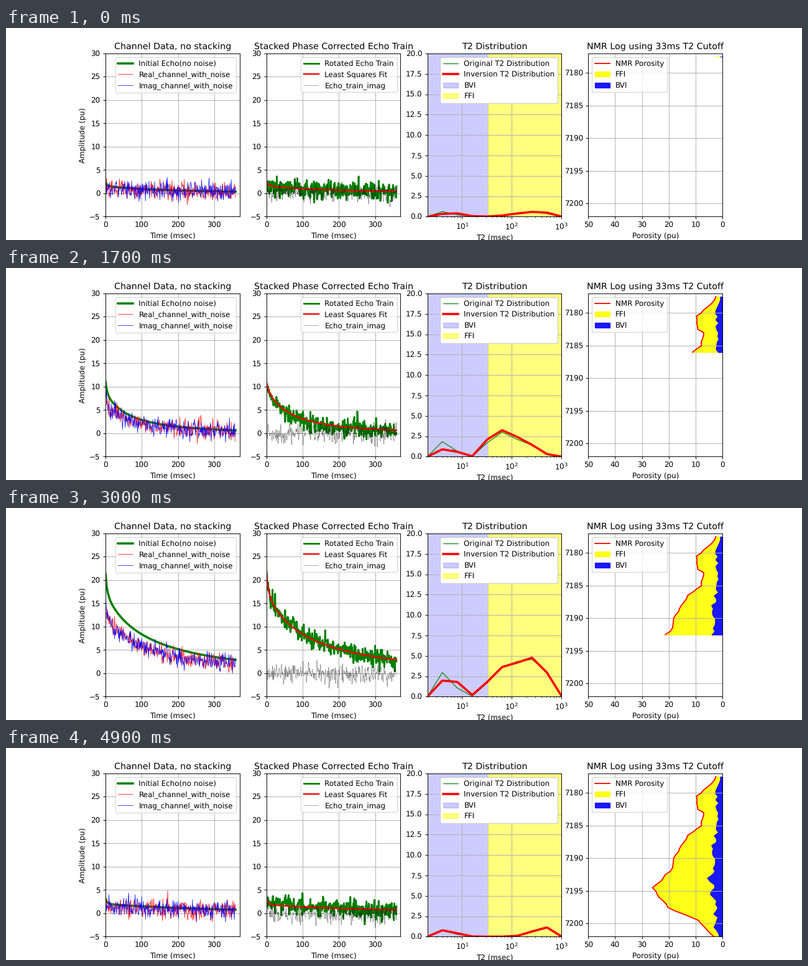
A matplotlib script that plays this animation: 1280 px wide and 341 px high, repeating every 5000 ms.

```python
import numpy as np
import matplotlib.pyplot as plt
from matplotlib.animation import FuncAnimation
from matplotlib.collections import PolyCollection
from matplotlib.patches import Patch

DPI = 1280 / 15
STEPS = 50
CUTOFF = 33

plt.rcParams["text.hinting"] = "no_hinting"

step = np.arange(STEPS)
depth = 7177.5 + 0.5 * step
t = np.arange(300) * 1.2
t2 = 2.0 ** np.arange(1, 11)
bins = np.arange(2, 10)          # log2 of T2, 4 to 512 ms


def bell(x, centre, width):
    return np.exp(-0.5 * ((x - centre) / width) ** 2)


# porosity follows a few turning points down the log
turns = [0, 2, 6, 10, 11, 15, 18, 21, 25, 28, 34, 40, 44, 49]
levels = [2.45, 4.2, 9.8, 8.9, 6.8, 7.9, 12.7, 15.2, 18.2, 18.6,
          25.8, 20.6, 9.2, 3.1]
rough = np.random.default_rng(8)
porosity = np.interp(step, turns, levels)
porosity[1:-1] += rough.normal(0, 0.2, STEPS - 2)

# bound fluid scatters about a broad bulge
bound = np.minimum(2.3 + 1.8 * bell(step, 29, 6), 0.35 * porosity)
bvi = bound * (1 + rough.uniform(-0.45, 0.45, STEPS))

# centre and width of the free fluid hump, in log2 of T2
marks = [0, 9, 17, 25, 35, 41, 49]
centre = np.interp(step, marks, [8, 6.2, 6.3, 7.8, 7, 7.3, 9])
width = np.interp(step, marks, [1.2, 1.4, 1.3, 2, 1.3, 2.2, 0.9])


def spectrum(i, low, low_centre, scatter, rng):
    """Two humps holding the bound and the free fluid of one depth."""
    small = bell(bins[:3], low_centre, 0.7)
    large = bell(bins[3:], centre[i], width[i])
    large *= np.exp(rng.normal(0, scatter, large.size))
    amps = np.r_[low * small / small.sum(),
                 (porosity[i] - low) * large / large.sum()]
    return np.pad(amps, 1)


def decay(amps):
    return np.exp(-t[:, None] / t2) @ amps


def band(left, right, y):
    return [np.column_stack([np.r_[left, right[::-1]], np.r_[y, y[::-1]]])]


fig, (ax1, ax2, ax3, ax4) = plt.subplots(
    1, 4, figsize=(1280.001 / DPI, 341.001 / DPI), dpi=DPI)


def setup(ax, title, xlabel, xlim, ylim):
    ax.set_title(title)
    ax.set_xlabel(xlabel)
    ax.set_xlim(*xlim)
    ax.set_ylim(*ylim)
    ax.grid(True)


def line(ax, color, width, label, style="-"):
    return ax.plot([], [], color=color, lw=width, ls=style, label=label)[0]


initial = line(ax1, "green", 3, "Initial Echo(no noise)")
real = line(ax1, "red", 0.6, "Real_channel_with_noise")
imag = line(ax1, "blue", 0.6, "Imag_channel_with_noise")
setup(ax1, "Channel Data, no stacking", "Time (msec)", (0, 370), (-5, 30))
ax1.set_ylabel("Amplitude (pu)")
ax1.legend(loc="upper right")

rotated = line(ax2, "green", 2.3, "Rotated Echo Train")
lsq = line(ax2, "red", 2, "Least Squares Fit")
residual = line(ax2, "black", 0.7, "Echo_train_imag", ":")
setup(ax2, "Stacked Phase Corrected Echo Train", "Time (msec)",
      (0, 370), (-5, 30))
ax2.legend(loc="upper right")

ax3.set_xscale("log")
true_t2 = line(ax3, "green", 1, "Original T2 Distribution")
fit_t2 = line(ax3, "red", 3, "Inversion T2 Distribution")
ax3.axvspan(1, CUTOFF, color="blue", alpha=0.2, label="BVI")
ax3.axvspan(CUTOFF, 2000, color="yellow", alpha=0.5, label="FFI")
setup(ax3, "T2 Distribution", "T2 (msec)", (2, 1000), (0, 20))
ax3.set_yticks(np.arange(0, 20.1, 2.5))
ax3.legend(loc="upper right", framealpha=1)

log_line = line(ax4, "red", 1.5, "NMR Porosity")
ffi_fill, bvi_fill = [
    ax4.add_collection(PolyCollection([], color=c, alpha=0.9, lw=1))
    for c in ("yellow", "blue")]
setup(ax4, "NMR Log using 33ms T2 Cutoff", "Porosity (pu)",
      (50, 0), (7202, 7177))
ax4.set_xticks(range(0, 51, 10))
ax4.set_yticks(range(7180, 7201, 5))
ax4.legend(handles=[log_line,
                    Patch(color="yellow", alpha=0.9, label="FFI"),
                    Patch(color="blue", alpha=0.9, label="BVI")],
           loc="upper left")


def update(i):
    rng = np.random.default_rng(100 + i)
    true = spectrum(i, bound[i], 2, 0.1, rng)
    fit = spectrum(i, bvi[i], rng.uniform(2, 3), 0.15, rng)
    clean = decay(true)
    noise = rng.normal(0, 1, (4, t.size))
    phase = np.pi / 4

    initial.set_data(t, clean)
    real.set_data(t, clean * np.cos(phase) + noise[0])
    imag.set_data(t, clean * np.sin(phase) + noise[1])
    rotated.set_data(t, clean + noise[2])
    lsq.set_data(t, decay(fit))
    residual.set_data(t, noise[3])
    true_t2.set_data(t2, true)
    fit_t2.set_data(t2, fit)

    y, por, low = depth[:i + 1], porosity[:i + 1], bvi[:i + 1]
    log_line.set_data(por, y)
    ffi_fill.set_verts(band(low, por, y))
    bvi_fill.set_verts(band(np.zeros(i + 1), low, y))
    return (initial, real, imag, rotated, lsq, residual, true_t2, fit_t2,
            log_line, ffi_fill, bvi_fill)


anim = FuncAnimation(fig, update, frames=STEPS, interval=100, repeat=True,
                     repeat_delay=0, blit=False)
plt.show()
```
